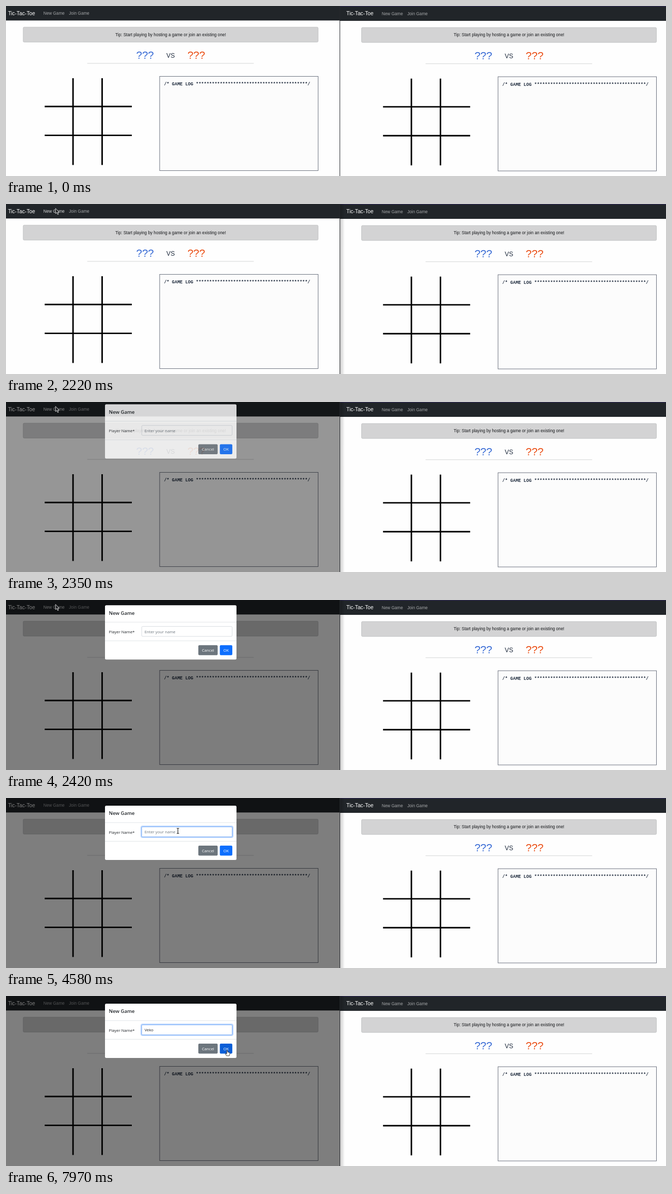
These frames come from a looping animation (1280x332 px, 8 s). An HTML page:

```html
<!DOCTYPE html>
<html lang="en">
<head>
<meta charset="utf-8">
<title>Tic-Tac-Toe</title>
<style>
  html, body { margin: 0; width: 100%; height: 100%; overflow: hidden; background: #fff; }
  svg { display: block; width: 1280px; height: 332px; }
  text { white-space: pre; }
  .page text { font: 8.2px "Liberation Sans", Arial, sans-serif; }
  .page .brand { font-size: 10.25px; fill: #fff; }
  .page .link { fill: #a4a6a8; }
  .page .player { font-size: 20.5px; }
  .page .versus { font-size: 12.3px; fill: #212d3f; }
  .page .log { font: bold 8.61px "Liberation Mono", "Courier New", monospace; fill: #212d3f; }
  .mid { text-anchor: middle; }
  #modal text { font: 7.7px "Open Sans", "Noto Sans", sans-serif; fill: #212529; }
  #modal .title { font-size: 9.5px; font-weight: 600; }
  #modal .button { fill: #fff; }
  #modal #hint { fill: #6c757d; }
</style>
</head>
<body>
<svg viewBox="0 0 1280 332" xmlns="http://www.w3.org/2000/svg">
  <defs>
    <clipPath id="leftClip"><rect width="647" height="332"/></clipPath>
    <clipPath id="rightClip"><rect x="648" width="632" height="332"/></clipPath>
    <linearGradient id="shade">
      <stop offset="0" stop-opacity=".2"/>
      <stop offset="1" stop-opacity="0"/>
    </linearGradient>
  </defs>
  <rect width="1280" height="332" fill="#fefefe"/>
  <g clip-path="url(#rightClip)"><g class="page" id="rightPage" transform="translate(656.2 .7)"></g></g>
  <rect x="648" width="632" height="1" fill="#2b2552"/>
  <g clip-path="url(#leftClip)">
    <g class="page" id="leftPage"></g>
    <rect id="backdrop" width="647" height="332"/>
  </g>
  <rect x="647" width="1" height="332" fill="#25282c"/>
  <rect id="shadow" x="648" width="9" height="332" fill="url(#shade)"/>

  <g id="modal">
    <rect x="192" y="15" width="255" height="106" rx="2.5" fill="#fff"/>
    <path d="M192 48H447M192 84.5H447" stroke="#dee2e6" stroke-width=".9"/>
    <text class="title" x="199.6" y="33.4">New Game</text>
    <text x="199.6" y="69.8">Player Name*</text>
    <rect id="ring" x="262" y="55" width="178" height="22" rx="3" fill="none" stroke="#0d6efd" stroke-opacity=".3" stroke-width="2"/>
    <rect x="263.2" y="56.4" width="175.4" height="19.4" rx="2" fill="#fff" stroke="#ced4da" stroke-width=".8"/>
    <rect id="focus" x="263.2" y="56.4" width="175.4" height="19.4" rx="2" fill="none" stroke="#86b7fe"/>
    <text id="hint" x="268.7" y="69.3">Enter your name</text>
    <text id="typed" x="268.7" y="69.3"></text>
    <rect id="caret" y="61" width="1" height="11" fill="#333"/>
    <rect x="373" y="93" width="37.5" height="19.5" rx="2" fill="#6c757d"/>
    <rect id="ok" x="414.7" y="93" width="24.2" height="19.5" rx="2"/>
    <text class="button mid" x="391.8" y="105.6">Cancel</text>
    <text class="button mid" x="426.8" y="105.6">OK</text>
  </g>

  <path id="arrow" d="M0 0V10.2L2.4 8L4.2 12L5.9 11.3L4.2 7.5H7.3Z" fill="#1c1e21" stroke="#fff" stroke-width=".8"/>
  <path id="beam" d="M-2.3-5H-.6L0-4.5L.6-5H2.3M0-4.5V4.5M-2.3 5H-.6L0 4.5L.6 5H2.3" fill="none" stroke="#111" stroke-width="1.1"/>
  <path id="hand" d="M-.9 .8Q0-.6 .9 .8V4Q2.1 3.5 2.4 4.5Q3.5 4 3.8 5Q5 4.6 5 6V8.2L4 11.2H-1.3L-3.7 7.4Q-3.5 5.9-2.2 6.6L-.9 7.8Z" fill="#fff" stroke="#111" stroke-width=".8"/>
</svg>
<script>
const LOOP = 8000, FRAME = 68, PLAYER = "Veko";
const OPEN = 2230, FOCUS = 3000, BLINK = 530;
const keyTimes = [5970, 6570, 6830, 6960];

const $ = id => document.getElementById(id);
const clamp = v => Math.max(0, Math.min(1, v));
const mix = (a, b, u) => a + (b - a) * u;
const ramp = (t, start, span) => clamp((t - start) / span);
const show = (id, on) => $(id).setAttribute("visibility", on ? "visible" : "hidden");
const fade = (id, v) => $(id).setAttribute("opacity", v);
const snap = (t, start) => start + Math.floor((t - start + 8) / FRAME) * FRAME;

const page = `
  <rect x="-10" y="-1" width="660" height="29.3" fill="#212529"/>
  <text class="brand" x="3.9" y="17.8">Tic-Tac-Toe</text>
  <text class="link" x="72.6" y="17">New Game</text>
  <text class="link" x="122" y="17">Join Game</text>
  <rect x="33.3" y="41.3" width="572" height="29.2" rx="2" fill="#d3d3d4" stroke="#bcbebf" stroke-width=".8"/>
  <text class="mid" x="319.3" y="58.6" fill="#141619">Tip: Start playing by hosting a game or join an existing one!</text>
  <text class="player mid" x="269.6" y="103.2" fill="#3468d4">???</text>
  <text class="versus mid" x="319.2" y="101.2">VS</text>
  <text class="player mid" x="369" y="103.2" fill="#ea4a0f">???</text>
  <path d="M157.5 112H480.5" stroke="#d4d5d6"/>
  <path d="M130 141V310.5M186.4 141V310.5M75 196.2H244M75 252.6H244" stroke="#000" stroke-width="2.9"/>
  <rect x="298" y="137.4" width="307.3" height="184" fill="#fcfcfc" stroke="#5b6270" stroke-width=".9"/>
  <text class="log" x="306.4" y="155">/* GAME LOG ${"*".repeat(42)}/</text>`;
$("leftPage").innerHTML = $("rightPage").innerHTML = page;
const newGame = $("leftPage").querySelector(".link");

function pointer(t) {
  if (t < 1200) return null;
  if (t < 2480) {
    const u = ramp(snap(t, 1200) + FRAME, 1200, 680);
    const e = 1 - (1 - u) ** 1.6;
    return { x: mix(-4, 96, e), y: mix(124, 8.5, e), kind: "arrow" };
  }
  if (t < 7490) {
    const u = ramp(snap(t, 2490) + FRAME, 2490, 400);
    const e = u * u * (3 - 2 * u);
    return { x: mix(96, 333.4, e), y: mix(8.5, 64.3, e), kind: u < 0.8 ? "arrow" : "beam" };
  }
  const u = ramp(snap(t, 7490) + FRAME, 7490, 476);
  const e = u * u * (3 - 2 * u);
  const y = mix(64.3, 105.6, e);
  return { x: mix(333.4, 429, e), y, kind: y < 76 ? "beam" : y < 93 ? "arrow" : "hand" };
}

function caretOn(t) {
  if (t < 3030) return false;
  const restart = [2990, ...keyTimes].filter(k => k <= t).pop();
  return Math.floor((t - restart) / BLINK) % 2 === 0;
}

function draw(t) {
  const cursor = pointer(t);
  for (const kind of ["arrow", "beam", "hand"]) {
    const on = cursor !== null && cursor.kind === kind;
    show(kind, on);
    if (on) $(kind).setAttribute("transform", `translate(${cursor.x} ${cursor.y})`);
  }
  const overLink = cursor && cursor.x > 72 && cursor.x < 115 && cursor.y < 28;
  newGame.style.fill = overLink ? "#d6d7d8" : "";

  const m = t < 2150 ? 0 : snap(t, 2150);
  const opacity = ramp(m, OPEN, 150);
  const slide = (1 - ramp(m, OPEN, 300)) ** 1.65;
  show("shadow", t >= 2150);
  fade("backdrop", opacity * 0.5);
  fade("modal", opacity);
  $("modal").setAttribute("transform", `translate(0 ${-25.6 * slide})`);

  const focus = t < 3030 ? 0 : ramp(snap(t, 3030), FOCUS, 150);
  fade("ring", focus);
  fade("focus", focus);

  const count = keyTimes.filter(k => k <= t).length;
  $("typed").textContent = PLAYER.slice(0, count);
  show("hint", count === 0);
  show("caret", caretOn(t));
  const width = count ? $("typed").getComputedTextLength() : 0;
  $("caret").setAttribute("x", Math.round(268.7 + width));

  const hover = ramp(t, 7820, 140);
  const blue = [[13, 11], [110, 94], [253, 215]].map(([a, b]) => Math.round(mix(a, b, hover)));
  $("ok").setAttribute("fill", `rgb(${blue})`);
}

const began = performance.now();
function tick() {
  draw((performance.now() - began) % LOOP);
  requestAnimationFrame(tick);
}
tick();
</script>
</body>
</html>
```
